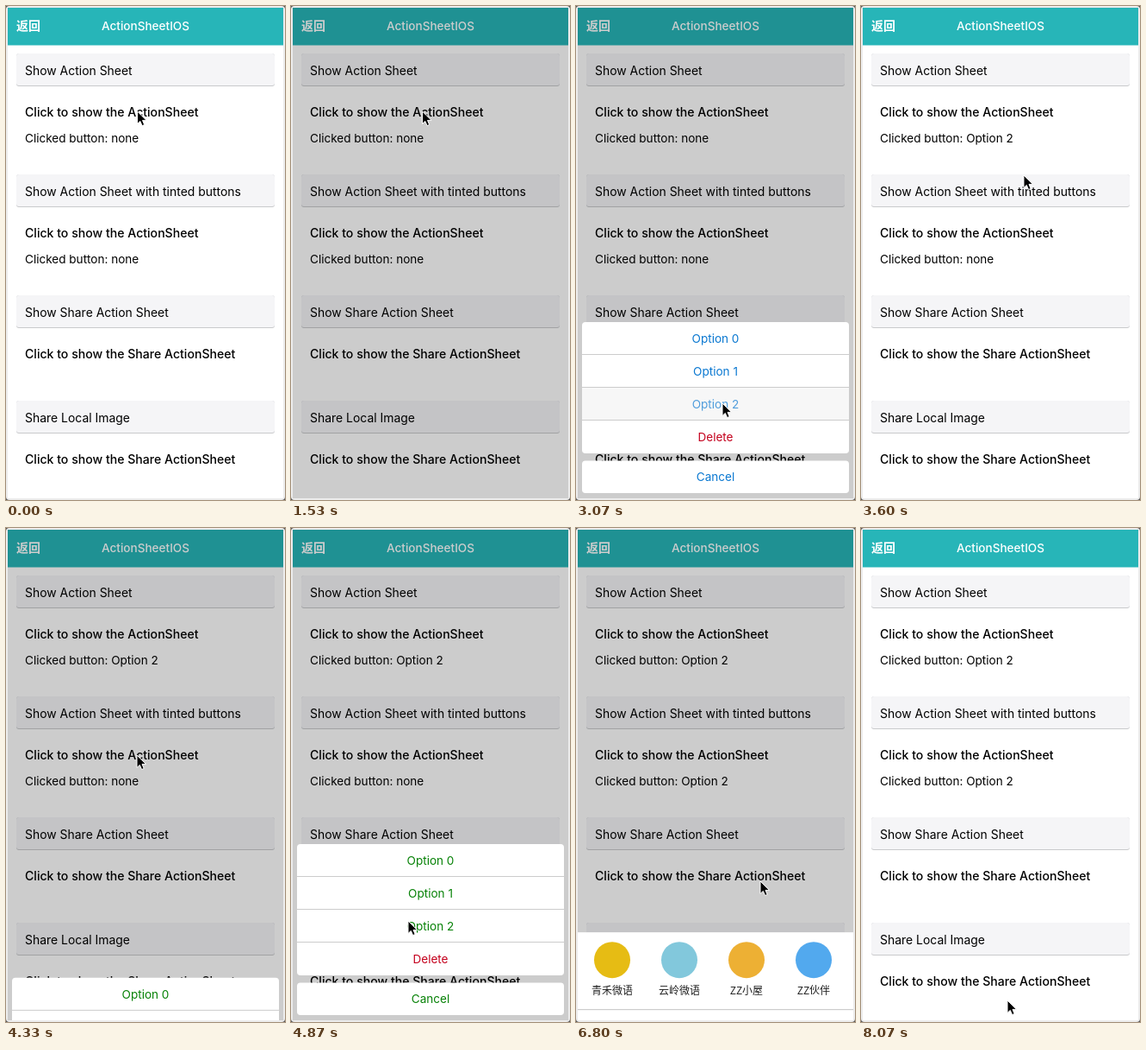
An HTML page that plays this animation: 324x572 px, repeating every 8.14 s.

```html
<!DOCTYPE html>
<html lang="en">
<head>
<meta charset="utf-8">
<title>ActionSheetIOS</title>
<style>
  html, body { margin: 0; width: 324px; height: 572px; overflow: hidden; background: #555; }
  svg { display: block; font: 13.55px Inter, "Noto Sans CJK SC", sans-serif; }
  .heading { font-size: 13.95px; }
  .link { font-size: 14.1px; font-weight: 500; }
  .title { font-weight: 500; fill: #fff; }
  .back { font-size: 14px; font-weight: 600; fill: #fff; }
  .mid { text-anchor: middle; }
  .label { font: 12px "Noto Sans CJK SC", "Noto Sans CJK", sans-serif; }
</style>
</head>
<body>
<svg id="stage" width="324" height="572" viewBox="0 0 324 572">
  <clipPath id="clip"><rect x="2" y="2" width="320" height="568"/></clipPath>
  <rect width="324" height="572" rx="4" fill="#ececec"/>
  <g clip-path="url(#clip)">
    <g id="page"></g>
    <rect id="dim" width="324" height="572"/>
    <g id="blue"></g>
    <g id="green"></g>
    <g id="share"></g>
  </g>
  <path id="cursor" d="M0 0V14.5L3.3 11.4L5.6 16.6L8.2 15.5L6 10.4H10.6Z" stroke="#fff"/>
</svg>
<script>
const LOOP = 8140;
const $ = id => document.getElementById(id);

function add(parent, tag, attrs, text = '') {
  const el = document.createElementNS('http://www.w3.org/2000/svg', tag);
  for (const key in attrs) el.setAttribute(key, attrs[key]);
  el.textContent = text;
  parent.append(el);
  return el;
}
const box = (g, x, y, width, height, fill, rx = 0) => add(g, 'rect', { x, y, width, height, fill, rx });
// y is the vertical middle of the line
const write = (g, x, y, text, cls = '', fill = '#000') =>
  add(g, 'text', { x, y: y + 5, class: cls, fill }, text);

// Page
const page = $('page');
box(page, 2, 2, 320, 568, '#fff');
box(page, 2, 2, 320, 43.5, '#27b5b8');
write(page, 12, 23, '返回', 'back');
write(page, 162, 23, 'ActionSheetIOS', 'title mid');

function card(y, heading, link, hasResult) {
  box(page, 12, y, 300, 38, '#c9cacc', 3);
  box(page, 12, y, 300, 37, '#f5f5f7', 3);
  write(page, 22, y + 20, heading, 'heading');
  write(page, 22, y + 68, link, 'link');
  return hasResult && write(page, 22, y + 98, '');
}
const results = [
  card(55, 'Show Action Sheet', 'Click to show the ActionSheet', true),
  card(195, 'Show Action Sheet with tinted buttons', 'Click to show the ActionSheet', true)
];
card(335, 'Show Share Action Sheet', 'Click to show the Share ActionSheet');
card(457, 'Share Local Image', 'Click to show the Share ActionSheet');

// Option sheets; returns the parts of the row that gets pressed
function optionSheet(g, tint) {
  box(g, 7, 366, 310, 152, '#fff', 4);
  box(g, 7, 526.5, 310, 37.5, '#fff', 4);
  const shade = box(g, 7, 442, 310, 37, '#f7f7f7');
  const labels = ['Option 0', 'Option 1', 'Option 2', 'Delete'].map((text, i) => {
    if (i) box(g, 7, 365 + 38 * i, 310, 1, '#ccc');
    return write(g, 162, 385 + 38 * i, text, 'mid', i < 3 ? tint : '#c4001d');
  });
  write(g, 162, 545, 'Cancel', 'mid', tint);
  return { shade, label: labels[2] };
}

// Share sheet
const share = $('share');
box(share, 2, 433, 320, 139, '#fff');
[['青禾微语', '#e6bc14'], ['云岭微语', '#82c8dc'], ['ZZ小屋', '#edb034'], ['ZZ伙伴', '#52a9ee']]
  .forEach(([name, fill], i) => {
    const cx = 42 + 78 * i;
    add(share, 'circle', { cx, cy: 465, r: 21, fill });
    write(share, cx, 500, name, 'label mid', '#222');
  });
box(share, 2, 522, 320, 1, '#c4c4c4');
write(share, 162, 547, 'Cancel', 'mid', '#0a78d1');

// Times: dim starts, sheet rises, press, sheet drops
const sheets = [
  { g: $('blue'), height: 206, open: 1270, rise: 1535, press: 3000, drop: 3130, row: optionSheet($('blue'), '#0a78d1') },
  { g: $('green'), height: 206, open: 4000, rise: 4240, press: 4940, drop: 5000, row: optionSheet($('green'), '#078207') },
  { g: share, height: 139, open: 6370, rise: 6613, press: 7430, drop: 7500 }
];

// Cursor stops: time, x, y
const stops = [
  [0, 152.5, 122], [1800, 152.5, 122], [2600, 170, 460], [3180, 170, 460], [3600, 189, 196],
  [3850, 152, 263], [4400, 152, 263], [4800, 136, 455], [5100, 136, 455], [5950, 214, 409],
  [6830, 214, 409], [7350, 170, 547], [LOOP, 170, 547]
];

const ramp = (t, start, length) => {
  const p = Math.min(1, Math.max(0, (t - start) / length));
  return p * p * (3 - 2 * p);
};

function draw(t) {
  let dim = 0;
  for (const { g, height, open, rise, press, drop, row } of sheets) {
    const up = ramp(t, rise, 280) - ramp(t, drop, 220);
    g.setAttribute('transform', `translate(0 ${height * (1 - up)})`);
    g.setAttribute('visibility', up > 0 ? 'visible' : 'hidden');
    dim += ramp(t, open, 220) - ramp(t, drop + 180, 220);
    if (row) {
      const pressed = t >= press && t < drop;
      row.shade.setAttribute('opacity', pressed ? 1 : 0);
      row.label.setAttribute('opacity', pressed ? 0.7 : 1);
    }
  }
  $('dim').setAttribute('opacity', 0.2 * dim);
  results.forEach((el, i) => {
    el.textContent = 'Clicked button: ' + (t >= sheets[i].drop ? 'Option 2' : 'none');
  });
  const next = stops.findIndex(s => s[0] > t);
  const [t0, x0, y0] = stops[next - 1], [t1, x1, y1] = stops[next];
  const p = ramp(t, t0, t1 - t0);
  $('cursor').setAttribute('transform', `translate(${x0 + (x1 - x0) * p} ${y0 + (y1 - y0) * p})`);
}

const start = performance.now();
function frame() {
  draw((performance.now() - start) % LOOP);
  requestAnimationFrame(frame);
}
frame();
</script>
</body>
</html>
```
